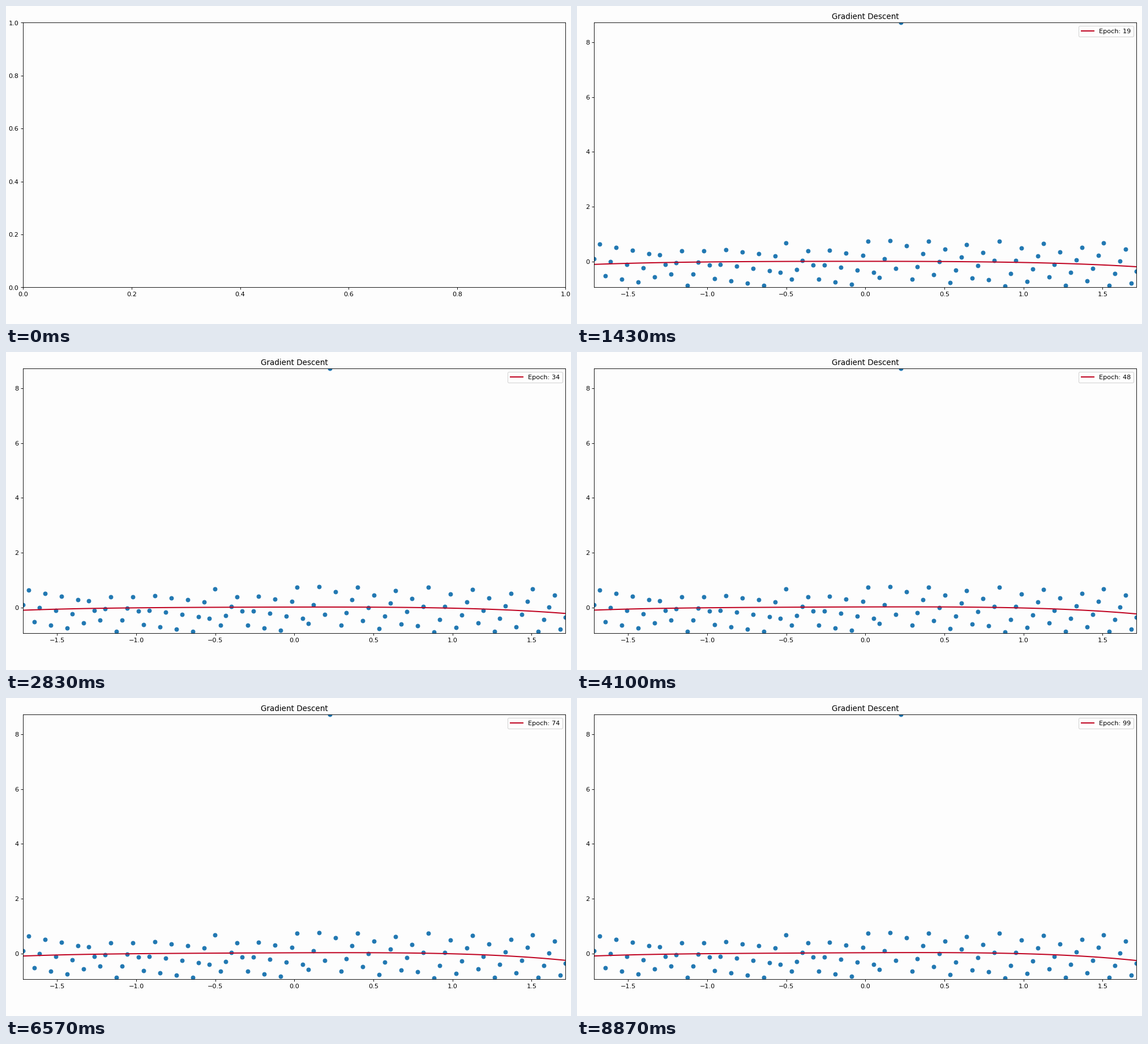
Recreate the animation shown at these times as a matplotlib script. Size 998 by 561 pixels, loop 8910 ms.

```python
import numpy as np
import matplotlib.pyplot as plt
from matplotlib.animation import FuncAnimation

W, H, DPI = 998, 561, 81
STEP, FRAMES = 30, 297
LEFT, RIGHT, TOP, BOTTOM = 30.3, 988.4, 29.5, 496.5
ZERO, UNIT = 450.8, 48.35  # stage row of y = 0, pixels per unit
COUNT, OUTLIER = 100, 56
PEAK, PERIOD = 413, 81.3   # top row and height of the sawtooth band
PAPER = "#fdfdfd"

plt.rcParams["font.family"] = "DejaVu Sans"


def to_y(row):
    return (ZERO - row) / UNIT


def sawtooth(index):
    """Climb at a varying pace and wrap inside the band."""
    knots = [(0, 2153), (10, 1900), (12, 1821), (14, 1693), (20, 1570),
             (22, 1457), (33, 1173), (35, 1068), (39, 1001), (41, 889),
             (51, 633), (52, 560), (55, 463), (57, 423), (71, 110),
             (74, 9), (75, 6), (93, -395), (94, -401), (99, -508)]
    climb = np.interp(index, *zip(*knots))
    return to_y(PEAK + (climb - PEAK) % PERIOD)


index = np.arange(COUNT)
x = (index - index.mean()) / index.std()
y = sawtooth(index)
y[OUTLIER] = to_y(TOP)

# Polynomial coefficients, constant term first
goal = np.array([0.032, 0.026, -0.0187, -0.026, -0.0175])
lag = np.array([-0.0434, -0.0509, -0.0075, 0.0329, 0.0132])


def fit(epoch):
    ramp = 1 - np.exp(-(epoch + 1) / 3)
    weights = ramp * (goal + lag * np.exp(-epoch / 32))
    return np.polynomial.polynomial.polyval(x, weights)


def epoch_at(ms):
    return int(min(0.018 * (ms - STEP), 0.010788 * ms + 4.05, 99))


fig = plt.figure(figsize=((W + 1e-6) / DPI, (H + 1e-6) / DPI), dpi=DPI,
                 facecolor=PAPER)
ax = fig.add_axes([LEFT / W, 1 - BOTTOM / H, (RIGHT - LEFT) / W, (BOTTOM - TOP) / H],
                  facecolor=PAPER)
dots = ax.scatter(x, y, color="#2178b2")
line, = ax.plot(x, fit(0), color="#c00422", lw=1.8, label="Epoch: 0")
title = ax.set_title("Gradient Descent")
legend = ax.legend(loc="upper right")
label = legend.get_texts()[0]


def update(i):
    started = i > 0
    for artist in (dots, line, title, legend):
        artist.set_visible(started)
    if not started:
        ax.set(xlim=(0, 1), ylim=(0, 1))
        return
    epoch = epoch_at(i * STEP)
    ax.set(xlim=(x[0], x[-1]), ylim=(to_y(BOTTOM), to_y(TOP)))
    line.set_ydata(fit(epoch))
    label.set_text(f"Epoch: {epoch}")


anim = FuncAnimation(fig, update, frames=FRAMES, init_func=lambda: update(0),
                     interval=STEP, repeat=True, repeat_delay=0)
plt.show()
```
